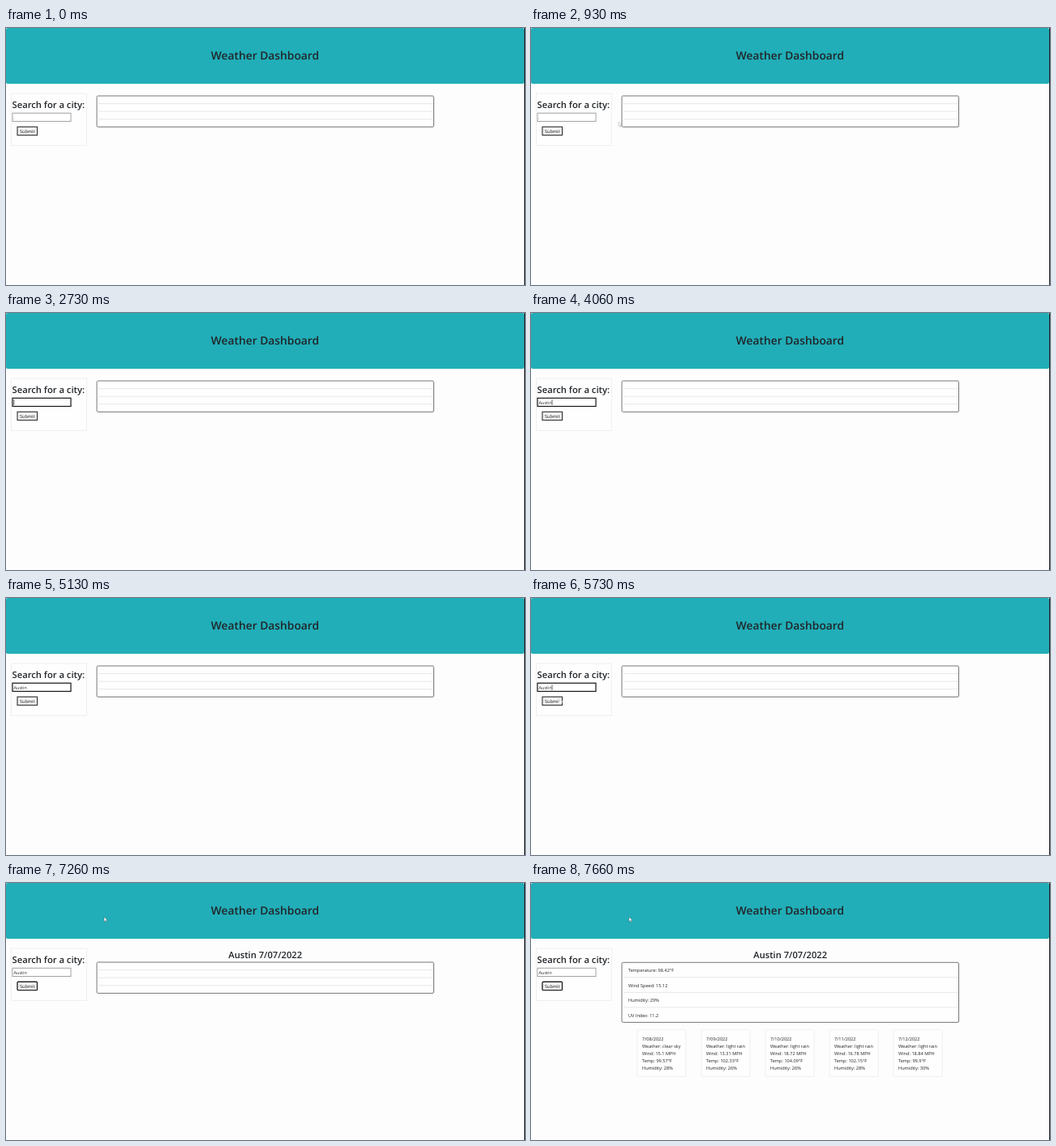
An HTML page for the animation above (8 s loop, 640 px wide and 318 px high).

```html
<!DOCTYPE html>
<html lang="en">
<head>
<meta charset="utf-8">
<title>Weather Dashboard</title>
<style>
html, body { margin: 0; width: 100%; height: 100%; overflow: hidden; background: #fdfdfd; }
svg { display: block; width: 640px; height: 318px; }
text { font: 5.6px "Open Sans", "Noto Sans", sans-serif; fill: #212529; text-rendering: geometricPrecision; white-space: pre; }
.h1 { font-size: 13.8px; font-weight: 600; text-anchor: middle; }
.h2 { font-size: 11.2px; font-weight: 600; }
.mid { text-anchor: middle; }
.box { fill: #fefefe; stroke: #ebebeb; stroke-width: .8; }
.list { fill: #fefefe; stroke: #777; }
.rule { stroke: #e3e3e3; stroke-width: .8; }

/* one shared 8 s clock; hard changes use step-end */
.t { animation: 8s step-end infinite; }
.input { animation-name: focus; }
.btn { animation-name: press; }
.type { animation-name: type; }
.caret { animation-name: blink; }
.shift { animation-name: shift; }
.empty { animation-name: until-data; }
.title { animation-name: heading; }
.data { animation-name: data; }
.hand { animation-name: hand; }
.arrow { animation-name: arrow; }
.pointer { animation: move 8s linear infinite; }

@keyframes focus {
  0%, 74.125% { stroke: #a2a2a2; stroke-width: 1px; }
  21.625% { stroke: #161616; stroke-width: 1.2px; }
}
@keyframes press {
  0% { stroke: #303030; stroke-width: 1.1px; rx: 0px; }
  74.125% { stroke: #2a2a2a; stroke-width: 1.4px; rx: 1.2px; }
}
@keyframes type {
  0% { transform: translateX(0); }
  45% { transform: translateX(3.5px); }
  46.6% { transform: translateX(6.9px); }
  47.5% { transform: translateX(11.4px); }
  49.1% { transform: translateX(12.8px); }
  50.75% { transform: translateX(16.3px); }
}
@keyframes blink {
  0%, 27.5%, 40.75%, 58.25%, 72.5% { opacity: 0; }
  21.625%, 34.125%, 45%, 64.875% { opacity: 1; }
}
@keyframes shift { 0% { transform: none; } 77.5% { transform: translateY(14px); } }
@keyframes until-data { 0% { opacity: 1; } 95.75% { opacity: 0; } }
@keyframes heading { 0% { opacity: 0; } 77.5% { opacity: 1; } }
@keyframes data { 0% { opacity: 0; } 95.75% { opacity: 1; } }
@keyframes arrow {
  0%, 16.625% { opacity: 0; }
  2.5% { opacity: .6; }
  86.6% { opacity: 1; }
}
@keyframes hand { 0%, 86.6% { opacity: 0; } 66% { opacity: 1; } }
@keyframes move {
  0%, 2.5% { transform: translate(150px, 152px); }
  6.625%, 11.625% { transform: translate(108px, 116px); }
  16.625% { transform: translate(84px, 110px); }
  16.63%, 63.25% { transform: translate(56px, 111px); }
  71.625% { transform: translate(35px, 124px); }
  73.25%, 85.75% { transform: translate(27px, 129px); }
  90.75%, 100% { transform: translate(121px, 42px); }
}
</style>
</head>
<body>
<svg viewBox="0 0 640 318">
  <rect width="640" height="318" fill="#fdfdfd"/>
  <rect width="639" height="69" rx="2" fill="#21aeb8"/>
  <path d="M639.5 0V318" stroke="#1c1c1c"/>
  <text class="h1" x="319.5" y="38.9">Weather Dashboard</text>

  <rect class="box" x="6.5" y="81" width="93" height="64.3"/>
  <text class="h2" x="7.6" y="99.2">Search for a city:</text>
  <rect x="8" y="105.3" width="72" height="10.2" fill="#fff"/>
  <text x="9.6" y="112.6" style="font-size:5.5px">Austin</text>
  <g class="t type">
    <rect x="9.7" y="106.5" width="20" height="8" fill="#fff"/>
    <path class="t caret" d="M9.8 107V114" stroke="#222" stroke-width=".7"/>
  </g>
  <rect class="t input" x="8" y="105.3" width="72" height="10.2" fill="none"/>
  <rect class="t btn" x="14" y="122.3" width="24.5" height="10.3" fill="#f0f0f0"/>
  <text class="mid" x="26.2" y="129.6">Submit</text>

  <g class="t empty"><g class="t shift" id="short"></g></g>
  <text class="h2 mid t title" x="319.7" y="93">Austin 7/07/2022</text>
  <g class="t data" id="data"></g>

  <g class="pointer">
    <path class="t arrow" d="M0 0V5.6L1.3 4.5L2.2 6.6L3.1 6.2L2.2 4.2H3.9Z" fill="#fff" stroke="#555" stroke-width=".4"/>
    <path class="t hand" d="M-.4 0Q.4-.8 1 0V2.4L3.4 3V5.2L2.6 6.8H-.2L-1.6 4.2L-.4 4.4Z" fill="#fff" stroke="#aaa" stroke-width=".3"/>
  </g>
</svg>
<script>
const text = (x, y, s) => `<text x="${x}" y="${y}">${s}</text>`;

// bordered list of four rows, with optional labels
function list(y, height, labels = []) {
  const row = height / 4;
  let out = `<rect class="list" x="112" y="${y}" width="415.5" height="${height}" rx="1.5"/>`;
  for (let i = 0; i < 4; i++) {
    const top = y + i * row;
    if (i) out += `<path class="rule" d="M112.5 ${top}H527"/>`;
    if (labels[i]) out += text(120, top + 12, labels[i]);
  }
  return out;
}

const days = [
  ["08", "clear sky", 15.1, 99.57, 28],
  ["09", "light rain", 13.31, 102.33, 26],
  ["10", "light rain", 18.72, 104.09, 26],
  ["11", "light rain", 16.78, 102.15, 28],
  ["12", "light rain", 18.84, 99.9, 30]
];

function card([day, sky, wind, temp, humidity], i) {
  const x = 131 + i * 79;
  const lines = [`7/${day}/2022`, `Weather: ${sky}`, `Wind: ${wind} MPH`, `Temp: ${temp}°F`, `Humidity: ${humidity}%`];
  return `<rect class="box" x="${x}" y="181.7" width="60" height="57.6" rx="1"/>` +
    lines.map((s, n) => text(x + 6, 195 + n * 9, s)).join("");
}

document.getElementById("short").innerHTML = list(84, 38.4);
document.getElementById("data").innerHTML =
  list(98.3, 74.1, ["Temperature: 98.42°F", "Wind Speed: 15.12", "Humidity: 29%", "UV Index: 11.2"]) +
  days.map(card).join("");
</script>
</body>
</html>
```
